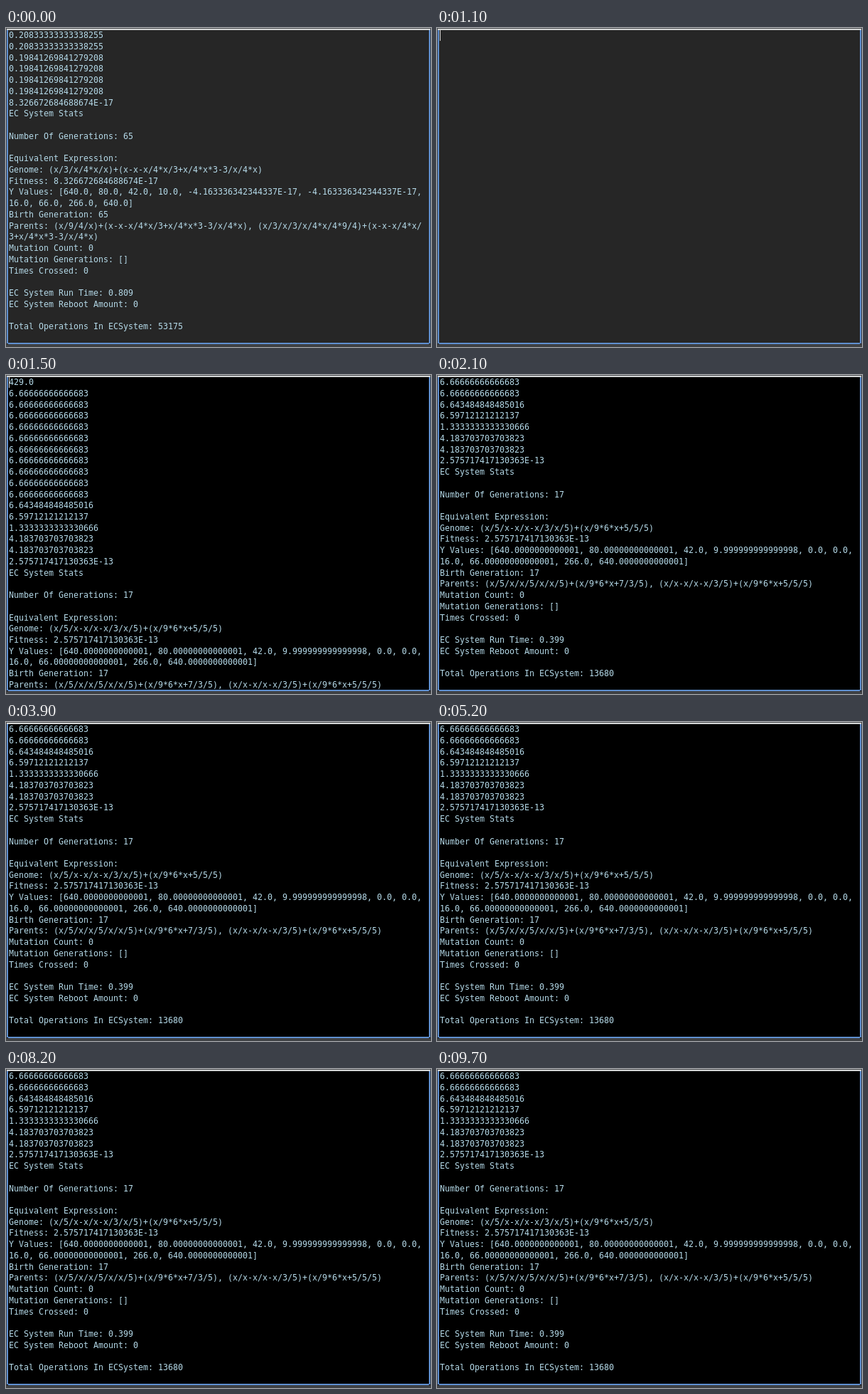
Animation, 598 px wide and 448 px high, one loop 9800 ms. Source, as an HTML page with a canvas:

```html
<!DOCTYPE html>
<html lang="en">
<head>
<meta charset="utf-8">
<title>Console run</title>
<style>
  html, body { margin: 0; width: 100%; height: 100%; overflow: hidden; background: #000; }
  canvas { display: block; }
</style>
</head>
<body>
<canvas id="stage" width="598" height="448"></canvas>
<script>
const LOOP = 9800;
const LINE = 15.73;
const GREY = '#262626';
const BLACK = '#000';
const ctx = document.getElementById('stage').getContext('2d');

const repeat = (text, count) => Array(count).fill(text);

const stats = run => [
  'EC System Stats', '',
  'Number Of Generations: ' + run.generations, '',
  'Equivalent Expression:',
  'Genome: ' + run.genome,
  'Fitness: ' + run.fitness,
  ...run.values,
  'Birth Generation: ' + run.generations,
  ...run.parents,
  'Mutation Count: 0',
  'Mutation Generations: []',
  'Times Crossed: 0', '',
  'EC System Run Time: ' + run.time,
  'EC System Reboot Amount: 0', '',
  'Total Operations In ECSystem: ' + run.operations
];

const firstRun = [
  ...repeat('0.20833333333338255', 2),
  ...repeat('0.19841269841279208', 4),
  '8.326672684688674E-17',
  ...stats({
    generations: 65,
    genome: '(x/3/x/4*x/x)+(x-x-x/4*x/3+x/4*x*3-3/x/4*x)',
    fitness: '8.326672684688674E-17',
    values: [
      'Y Values: [640.0, 80.0, 42.0, 10.0, -4.163336342344337E-17, -4.163336342344337E-17,',
      '16.0, 66.0, 266.0, 640.0]'
    ],
    parents: [
      'Parents: (x/9/4/x)+(x-x-x/4*x/3+x/4*x*3-3/x/4*x), (x/3/x/3/x/4*x/4*9/4)+(x-x-x/4*x/',
      '3+x/4*x*3-3/x/4*x)'
    ],
    time: '0.809',
    operations: 53175
  })
];

const secondRun = [
  '429.0',
  ...repeat('6.66666666666683', 10),
  '6.643484848485016',
  '6.59712121212137',
  '1.3333333333330666',
  ...repeat('4.183703703703823', 2),
  '2.575717417130363E-13',
  ...stats({
    generations: 17,
    genome: '(x/5/x-x/x-x/3/x/5)+(x/9*6*x+5/5/5)',
    fitness: '2.575717417130363E-13',
    values: [
      'Y Values: [640.0000000000001, 80.00000000000001, 42.0, 9.999999999999998, 0.0, 0.0,',
      '16.0, 66.00000000000001, 266.0, 640.0000000000001]'
    ],
    parents: ['Parents: (x/5/x/x/5/x/x/5)+(x/9*6*x+7/3/5), (x/x-x/x-x/3/5)+(x/9*6*x+5/5/5)'],
    time: '0.399',
    operations: 13680
  })
];

// Each step holds until the next one starts.
const steps = [
  { at: 0, lines: firstRun, count: firstRun.length, back: GREY },
  { at: 900, lines: [], count: 0, back: GREY, caret: true },
  { at: 1200, lines: secondRun, count: 3, back: BLACK, caret: true },
  { at: 1300, lines: secondRun, count: 8, back: BLACK, caret: true },
  { at: 1400, lines: secondRun, count: 13, back: BLACK, caret: true },
  { at: 1500, lines: secondRun, count: 28, back: BLACK, caret: true },
  { at: 1600, lines: secondRun.slice(-27), count: 27, back: BLACK }
];

function rect(color, x, y, w, h) {
  ctx.fillStyle = color;
  ctx.fillRect(x, y, w, h);
}

function drawFrame() {
  rect('#3c4047', 0, 0, 1, 448);
  rect('#3c4047', 597, 0, 1, 448);
  rect('#3f4144', 0, 444, 598, 4);
  rect('#5f8fd0', 1, 2, 2, 441);
  rect('#5f8fd0', 595, 2, 2, 441);
  rect('#5f8fd0', 3, 442, 592, 2);
  rect('#4a4c4e', 0, 0, 598, 1);
  rect('#d4d6d6', 1, 1, 596, 2);
}

function draw(step) {
  rect(step.back, 0, 0, 598, 448);
  ctx.font = '11.63px "DejaVu Sans Mono", monospace';
  ctx.fillStyle = '#b4d9e8';
  step.lines.slice(0, step.count).forEach((text, i) => {
    ctx.fillText(text, 4, 14.2 + i * LINE);
  });
  if (step.caret) rect('#d8d8d8', 4, 3, 1, 15);
  drawFrame();
}

let shown;
function tick(now) {
  const time = now % LOOP;
  const step = steps.findLast(s => s.at <= time) || steps[0];
  if (step !== shown) draw(shown = step);
  requestAnimationFrame(tick);
}
draw(shown = steps[0]);
requestAnimationFrame(tick);
</script>
</body>
</html>
```
